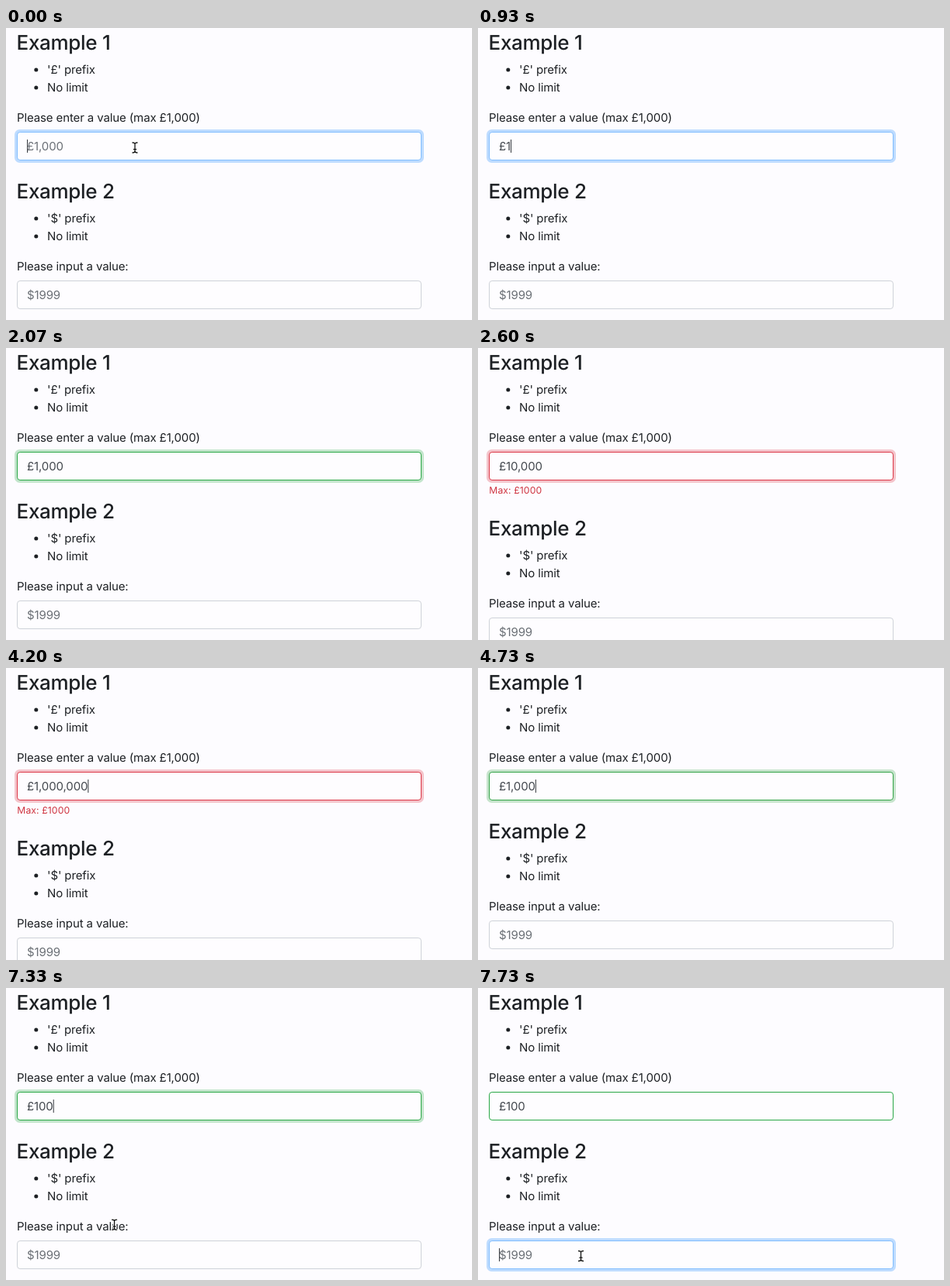
Write an HTML page that moves like this. It is 600x377 px and loops after 8 s.

```html
<!DOCTYPE html>
<html lang="en">
<head>
<meta charset="utf-8">
<title>Currency inputs</title>
<style>
  html, body { margin: 0; width: 100%; height: 100%; overflow: hidden; background: #fdfcff; }
  svg { display: block; width: 100%; height: 100%; }
  text { font: 15px Inter, Roboto, sans-serif; letter-spacing: -.12px; fill: #1d2024; white-space: pre; text-rendering: geometricPrecision; }
  .title { font-size: 26px; font-weight: 500; letter-spacing: -.3px; }
  .error { font-size: 12.2px; letter-spacing: .1px; fill: #cf3440; }
  .value { fill: #43484e; }
  .hint { fill: #6b7076; }
  .box { fill: #fefdff; }
  .caret { fill: #33373c; }
</style>
</head>
<body>
<svg viewBox="0 0 600 377">
  <g id="first"></g>
  <text id="error" class="error" x="14.3" y="188">Max: £1000</text>
  <g id="second"></g>
  <g id="mouse" fill="none" stroke-linecap="round">
    <path id="beam" stroke="#fff" stroke-width="3" d="M-3-6.5Q0-6.5 0-4.5V4.5Q0 6.5-3 6.5M3-6.5Q0-6.5 0-4.5M0 4.5Q0 6.5 3 6.5M-1.6 2.2H1.6"/>
    <use href="#beam" id="ink"/>
  </g>
</svg>
<script>
const LOOP = 8000, FADE = 150, ERROR_SHIFT = 22;
const $ = id => document.getElementById(id);

// The I-beam is a dark line over a light outline.
const ink = $('beam').cloneNode();
ink.removeAttribute('id');
ink.setAttribute('stroke', '#111');
ink.setAttribute('stroke-width', '1.3');
$('ink').replaceWith(ink);

function section(id, title, sign, label, hint) {
  const bullet = (y, s) => `<circle cx="38.8" cy="${y - 5}" r="2.5" fill="#1d2024"/><text x="53" y="${y}">${s}</text>`;
  const root = $(id);
  root.innerHTML = `
    <text class="title" x="13.5" y="28">${title}</text>
    ${bullet(59, `'${sign}' prefix`)}${bullet(82, 'No limit')}
    <text x="14" y="120.5">${label}</text>
    <rect class="ring" x="11" y="131" width="527" height="43" rx="6.5"/>
    <rect class="box" x="14.5" y="134.5" width="520" height="36" rx="3.6"/>
    <text class="hint" x="27" y="158">${hint}</text>
    <text class="value" x="27" y="158"></text>
    <rect class="caret" y="144" width="1" height="17"/>`;
  const part = name => root.querySelector('.' + name);
  return { root, ring: part('ring'), box: part('box'), hint: part('hint'), value: part('value'), caret: part('caret') };
}

const first = section('first', 'Example 1', '£', 'Please enter a value (max £1,000)', '£1,000');
const second = section('second', 'Example 2', '$', 'Please input a value:', '$1999');

// Border rgb, then ring rgb and alpha.
const STYLES = {
  idle: [206, 210, 216, 0, 123, 255, 0],
  focus: [128, 189, 255, 0, 123, 255, .25],
  valid: [40, 167, 69, 40, 167, 69, .27],
  left: [40, 167, 69, 40, 167, 69, 0],
  invalid: [220, 53, 69, 220, 53, 69, .28]
};
const firstStyle = [[0, 'focus'], [930, 'valid'], [2130, 'invalid'], [4600, 'valid'], [7530, 'left']];
const secondStyle = [[0, 'idle'], [7530, 'focus']];
const typed = [
  [0, ''], [930, '£1'], [1070, '£10'], [1200, '£100'], [1400, '£1,000'],
  [2130, '£10,000'], [3600, '£100,000'], [3800, '£1,000,000'],
  [4470, '£100,000'], [4530, '£10,000'], [4600, '£1,000'],
  [4800, '£100'], [4870, '£10'], [5930, '£100']
];
const blinks = [270, 800, 1870, 2130, 2600, 3070, 4270, 4470, 5270, 5800, 6400, 6930, 7530];

const lastKey = (keys, t) => keys.findLastIndex(k => k[0] <= t);
const ease = p => { p = Math.min(1, Math.max(0, p)); return p * p * (3 - 2 * p); };
const show = (el, on) => el.setAttribute('visibility', on ? 'visible' : 'hidden');

function paintField(field, keys, t, text, caretOn) {
  const i = lastKey(keys, t);
  const to = STYLES[keys[i][1]], from = i ? STYLES[keys[i - 1][1]] : to;
  const p = ease((t - keys[i][0]) / FADE);
  const c = from.map((v, k) => v + (to[k] - v) * p);
  field.box.setAttribute('stroke', `rgb(${c.slice(0, 3)})`);
  field.ring.setAttribute('fill', `rgba(${c.slice(3)})`);
  if (field.value.textContent !== text) field.value.textContent = text;
  show(field.hint, !text);
  show(field.caret, caretOn);
  field.caret.setAttribute('x', 27 + (text ? field.value.getComputedTextLength() : 0));
}

function draw(t) {
  const caretOn = blinks.filter(b => b <= t).length % 2 === 0;
  paintField(first, firstStyle, t, typed[lastKey(typed, t)][1], caretOn && t < 7530);
  paintField(second, secondStyle, t, '', t >= 7530);

  const invalid = t >= 2130 && t < 4600;
  show($('error'), invalid);
  second.root.setAttribute('transform', `translate(0 ${192 + (invalid ? ERROR_SHIFT : 0)})`);

  const p = t < 930 ? 0 : ease((t - 7000) / 470);
  show($('mouse'), t < 930 || t >= 7000);
  $('mouse').setAttribute('transform', `translate(${166 - 33.5 * p} ${154.5 + 191.5 * p})`);
}

const start = performance.now();
function tick() {
  draw((performance.now() - start) % LOOP);
  requestAnimationFrame(tick);
}
tick();
</script>
</body>
</html>
```
